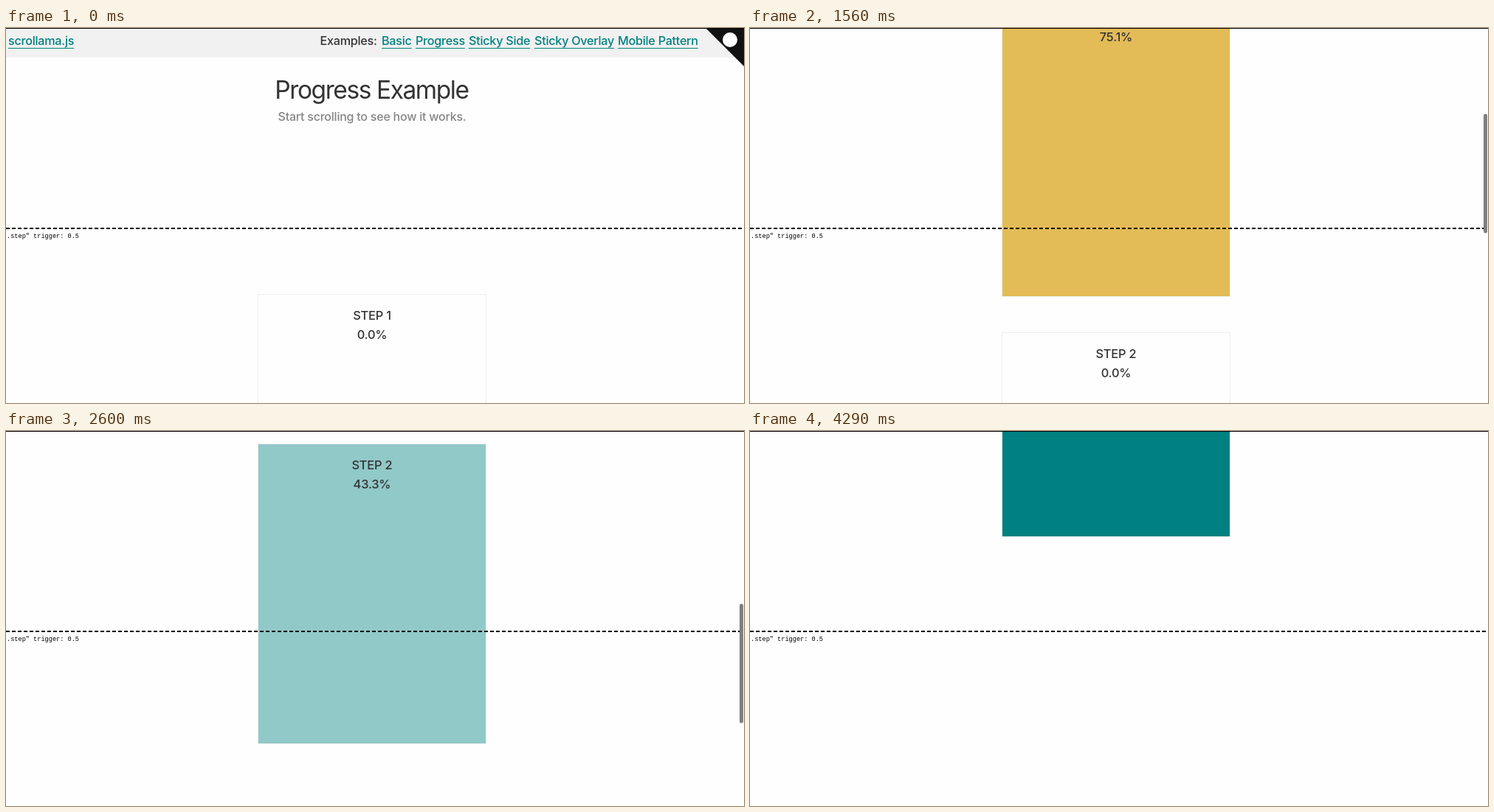
An HTML page for the animation above (4550 ms loop, 1000 px wide and 509 px high).

```html
<!DOCTYPE html>
<html lang="en">
<head>
<meta charset="utf-8">
<title>Progress Example</title>
<style>
  html, body { margin: 0; width: 100%; height: 100%; overflow: hidden; background: #fefefe; }
  svg { display: block; width: 1000px; height: 509px; }
  text { font: 450 16.2px Inter, "Open Sans", sans-serif; letter-spacing: -.27px; fill: #333; }
  .mid { text-anchor: middle; }
  .title { font-size: 33.5px; font-weight: 400; letter-spacing: -1.43px; }
  .sub { font-size: 16px; letter-spacing: -.23px; fill: #858585; }
  .step text { font-size: 16.4px; letter-spacing: -.2px; }
  .link text { fill: #008080; }
  .link path { stroke: #008080; }
  .mono { font: 8.6px "Liberation Mono", Courier, monospace; letter-spacing: 0; fill: #000; }
</style>
</head>
<body>
<svg viewBox="0 0 1000 509">
  <rect width="1000" height="509" fill="#fefefe"/>
  <g id="page">
    <rect width="1000" height="40" fill="#f1f1f1"/>
    <g id="nav"><text x="425.5" y="23">Examples:</text></g>
    <path d="M949 1H1000V52Z" fill="#111"/>
    <circle cx="981" cy="16" r="10" fill="#fff"/>
    <text class="mid title" x="495.5" y="96">Progress Example</text>
    <text class="mid sub" x="496" y="126">Start scrolling to see how it works.</text>
  </g>
  <path d="M0 272H1000" stroke="#000" stroke-width="2" stroke-dasharray="5 3"/>
  <text class="mono" x="1" y="285">.step" trigger: 0.5</text>
  <rect id="thumb" x="994" width="5" height="162" rx="2.5" fill="#7f7f7f"/>
  <rect width="1000" height="1"/>
</svg>
<script>
const LOOP = 4550, TICK = 130, TRIGGER = 271, STEP_H = 407;
const SCROLL_START = 780, FADE_END = 4290, FADE = 390;
const $ = id => document.getElementById(id);
const clamp = v => Math.max(0, Math.min(1, v));

function add(parent, tag, attrs, text = "") {
  const el = document.createElementNS("http://www.w3.org/2000/svg", tag);
  for (const k in attrs) el.setAttribute(k, attrs[k]);
  el.textContent = text;
  return parent.appendChild(el);
}

function addLink(label, x) {
  const g = add($("nav"), "g", { class: "link" });
  const width = add(g, "text", { x, y: 23 }, label).getComputedTextLength();
  add(g, "path", { d: `M${x} 27.5h${width}` });
}
addLink("scrollama.js", 3);
addLink("Basic", 509);
addLink("Progress", 555);
addLink("Sticky Side", 627);
addLink("Sticky Overlay", 716);
addLink("Mobile Pattern", 829);

function makeStep(n, top, color) {
  const g = add($("page"), "g", { class: "step", transform: `translate(341 ${top})` });
  add(g, "rect", { x: .5, y: .5, width: 309, height: 407, fill: "#fefefe", stroke: "#efefef" });
  const fill = add(g, "rect", { x: 1, y: 1, width: 308, height: 406, fill: color });
  add(g, "text", { class: "mid", x: 155, y: 35 }, "STEP " + n);
  const label = add(g, "text", { class: "mid", x: 155, y: 61 });
  return { top, fill, label };
}
const steps = [makeStep(1, 361, "goldenrod"), makeStep(2, 817, "teal")];

// time, scroll position, position last reported to the progress reading
const keys = [
  [0, 0, 0], [650, 0, 0], [1170, 161, 140.5], [1560, 404, 395.7], [2080, 490, 468],
  [2600, 800, 722.3], [2860, 1006, 960], [3120, 1062, 1060], [3510, 1081, 1081], [LOOP, 1081, 1081]
];

function positions(t) {
  const i = keys.findIndex(k => k[0] > t);
  const a = keys[i - 1], b = keys[i];
  const u = (t - a[0]) / (b[0] - a[0]);
  return [1, 2].map(k => a[k] + (b[k] - a[k]) * u);
}

function draw(time) {
  const t = Math.floor(time / TICK) * TICK;
  const [scroll, seen] = t < SCROLL_START ? [0, 0] : positions(t);
  $("page").setAttribute("transform", `translate(0 ${-Math.round(scroll)})`);
  for (const { top, fill, label } of steps) {
    const p = clamp((TRIGGER - top + seen) / STEP_H);
    fill.setAttribute("opacity", p);
    label.textContent = (p * 100).toFixed(1) + "%";
  }
  $("thumb").setAttribute("y", scroll * .2985 - 4.2);
  $("thumb").setAttribute("opacity", t < SCROLL_START ? 0 : clamp((FADE_END - t) / FADE));
}

const began = performance.now();
function loop() {
  draw((performance.now() - began) % LOOP);
  requestAnimationFrame(loop);
}
loop();
</script>
</body>
</html>
```
